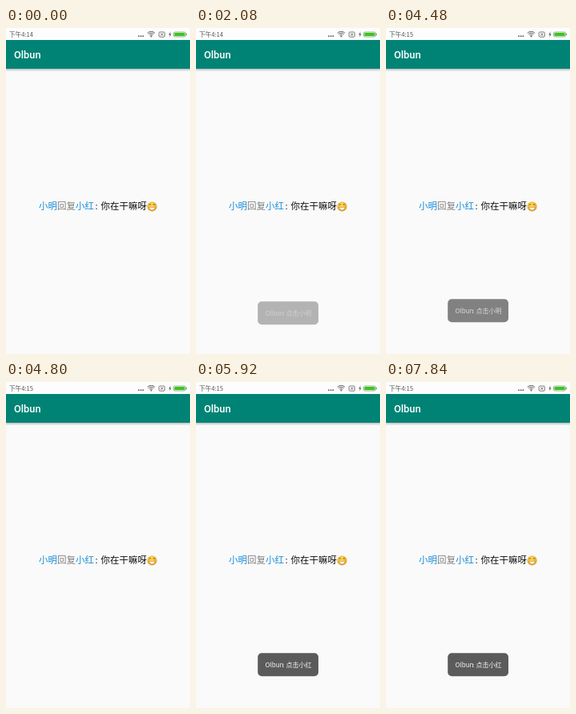
An HTML page with a canvas for the animation above (8 s loop, 230x408 px).

```html
<!DOCTYPE html>
<html lang="zh-CN">
<head>
<meta charset="utf-8">
<title>Toast demo</title>
<style>
html, body { margin: 0; width: 100%; height: 100%; overflow: hidden; background: #fafafa; }
canvas { display: block; width: 230px; height: 408px; }
</style>
</head>
<body>
<canvas id="stage"></canvas>
<script>
const W = 230, H = 408, LOOP = 8000, TICK = 160;
const APP = 'Olbun';
const CJK = '"Noto Sans CJK SC", "Noto Sans CJK", sans-serif';
const canvas = document.getElementById('stage');
const ctx = canvas.getContext('2d');
const dpr = window.devicePixelRatio || 1;
canvas.width = W * dpr;
canvas.height = H * dpr;

// Toast poses: [start ms, vertical offset, opacity, name]
const poses = [
  [0, 0, 0, ''],
  [2080, 3, 0.45, '小明'], [2240, -6, 1, '小明'], [2400, -0.4, 1, '小明'], [2560, 0, 1, '小明'],
  [4480, 0, 0.76, '小明'], [4640, 0, 0.3, '小明'], [4800, 0, 0, ''],
  [5600, 3, 0.45, '小红'], [5760, -5, 1, '小红'], [5920, 0, 1, '小红'],
  [7200, 0, 0.76, '小红'], [7360, 0, 0.3, '小红'],
  [7520, -6, 0.9, '小红'], [7680, -2.4, 1, '小红'], [7840, 0, 1, '小红']
];

function text(str, x, y, size, color, weight = 400, family = CJK) {
  ctx.font = `${weight} ${size}px ${family}`;
  ctx.fillStyle = color;
  ctx.fillText(str, x, y);
}

function rect(x, y, w, h, color) {
  ctx.fillStyle = color;
  ctx.fillRect(x, y, w, h);
}

function round(x, y, w, h, r) {
  ctx.beginPath();
  ctx.roundRect(x, y, w, h, r);
}

function disc(x, y, r, color) {
  ctx.beginPath();
  ctx.arc(x, y, r, 0, Math.PI * 2);
  ctx.fillStyle = color;
  ctx.fill();
}

function poly(points, color) {
  ctx.beginPath();
  points.forEach(([x, y]) => ctx.lineTo(x, y));
  ctx.closePath();
  ctx.fillStyle = color;
  ctx.fill();
}

function wifi(active) {
  ctx.strokeStyle = '#5c5c5c';
  ctx.lineWidth = 1;
  for (const r of [2.6, 4.6, 6.6]) {
    ctx.beginPath();
    ctx.arc(181.5, 11, r, -Math.PI * 0.75, -Math.PI * 0.25);
    ctx.stroke();
  }
  disc(181.5, 10.4, 1, '#5c5c5c');
  if (active) poly([[183.4, 9.4], [186.6, 9.4], [185, 11.6]], '#777');
}

function statusBar(t) {
  rect(0, 0, W, 15, '#fdfdfd');
  text(t < 3520 ? '下午4:14' : '下午4:15', 4, 11.2, 7.6, '#555');
  for (let i = 0; i < 3; i++) disc(166 + i * 2.7, 10.2, 0.9, '#555');
  wifi(t >= 3200 && t < 4480);

  ctx.strokeStyle = '#707070';
  ctx.lineWidth = 0.9;
  round(191.2, 5, 7.2, 6.2, 1.2);
  ctx.stroke();
  ctx.beginPath();
  ctx.moveTo(193.2, 6.5);
  ctx.lineTo(196.5, 9.8);
  ctx.moveTo(196.5, 6.5);
  ctx.lineTo(193.2, 9.8);
  ctx.stroke();

  poly([[205.6, 4.6], [203.4, 8.6], [204.9, 8.6], [204.3, 11.6], [206.6, 7.5], [205.1, 7.5]], '#555');

  ctx.strokeStyle = '#7aa876';
  ctx.lineWidth = 0.8;
  round(209.4, 5, 15.2, 6, 2);
  ctx.stroke();
  round(210.4, 5.9, 13.2, 4.2, 1.2);
  ctx.fillStyle = '#3fc51f';
  ctx.fill();
  rect(225, 6.8, 1.1, 2.4, '#7aa876');
}

function appBar() {
  const shade = ctx.createLinearGradient(0, 51, 0, 54.5);
  shade.addColorStop(0, 'rgba(0,0,0,0.24)');
  shade.addColorStop(1, 'rgba(0,0,0,0)');
  rect(0, 51, W, 3.5, shade);
  rect(0, 15, W, 36, '#008375');
  text(APP, 10, 38.3, 12.8, '#fff', 500, 'Roboto, sans-serif');
}

function grin(x, y) {
  const face = ctx.createRadialGradient(x - 1, y - 2, 1, x, y, 6.2);
  face.addColorStop(0, '#ffe168');
  face.addColorStop(0.75, '#f9c02c');
  face.addColorStop(1, '#d48a18');
  disc(x, y, 6, face);
  ctx.strokeStyle = '#69400f';
  ctx.lineWidth = 0.9;
  for (const side of [-1, 1]) {
    ctx.beginPath();
    ctx.arc(x + side * 2.4, y - 1.5, 1.3, Math.PI * 1.1, Math.PI * 1.9);
    ctx.stroke();
  }
  ctx.beginPath();
  ctx.moveTo(x - 4, y + 0.5);
  ctx.quadraticCurveTo(x, y + 1.3, x + 4, y + 0.5);
  ctx.quadraticCurveTo(x + 3, y + 4.6, x, y + 4.6);
  ctx.quadraticCurveTo(x - 3, y + 4.6, x - 4, y + 0.5);
  ctx.fillStyle = '#fff';
  ctx.fill();
  ctx.strokeStyle = '#a8691a';
  ctx.lineWidth = 0.6;
  ctx.stroke();
}

function message() {
  const size = 11.5, x = 41, y = 227.4;
  text('小明', x, y, size, '#168cd8');
  text('回复', x + size * 2, y, size, '#808080');
  text('小红', x + size * 4, y, size, '#168cd8');
  text(':', 111.6, y, size, '#333');
  text('你在干嘛呀', 118.5, y, size, '#111');
  grin(182.6, 223.5);
}

function toast(t) {
  const [, dy, alpha, name] = poses.findLast(p => p[0] <= t);
  if (!alpha) return;
  ctx.save();
  ctx.globalAlpha = alpha;
  ctx.translate(0, dy);
  round(77.2, 339.3, 75.8, 28.9, 5);
  ctx.fillStyle = '#5b5b5b';
  ctx.fill();
  text(APP, 86.5, 356.8, 8, '#f4f4f4', 300);
  text(':', 108, 356.8, 8, '#f4f4f4', 300);
  text('点击' + name, 112.6, 356.8, 8, '#f4f4f4', 300);
  ctx.restore();
}

function draw(t) {
  ctx.setTransform(dpr, 0, 0, dpr, 0, 0);
  rect(0, 0, W, H, '#fafafa');
  statusBar(t);
  appBar();
  message();
  toast(t);
}

const start = performance.now();
function loop() {
  const t = (performance.now() - start) % LOOP;
  draw(Math.floor(t / TICK) * TICK);
  requestAnimationFrame(loop);
}
loop();
</script>
</body>
</html>
```
